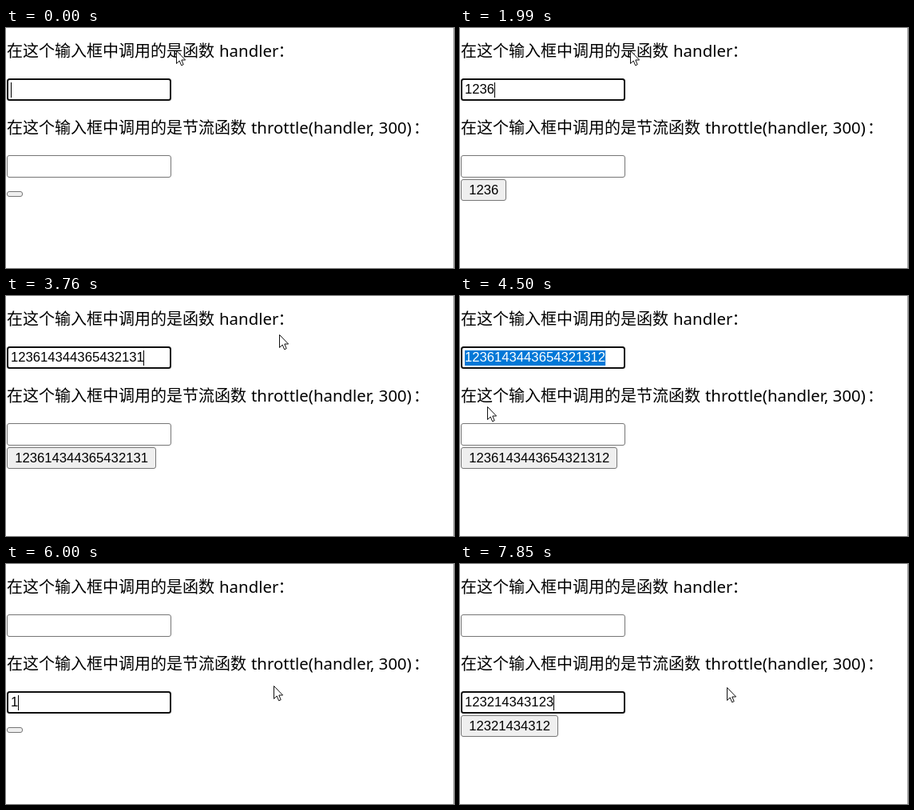
Write an HTML page that moves like this. It is 561 px wide and 300 px high and loops after 8000 ms.

```html
<!DOCTYPE html>
<html lang="zh-CN">
<head>
<meta charset="utf-8">
<style>
  html, body { margin: 0; height: 100%; overflow: hidden; background: #fff; }
  svg { display: block; }
  .label { font: 20px "Noto Sans CJK SC", "Noto Sans CJK", sans-serif; }
  .latin { font: 20.4px "Noto Sans", sans-serif; }
  .value { font: 16.667px "Liberation Sans", Arial, sans-serif; }
  .box { stroke: #767676; fill: #fff; }
  .focus { stroke: #101010; stroke-width: 2; }
  .selected { fill: #fff; }
</style>
</head>
<body>
<svg width="561" height="300" viewBox="0 0 561 300">
  <path d="M560.5 0V300" stroke="#a6a6a6"/>
  <g class="label">
    <text x="1" y="36">在这个输入框中调用的是函数</text>
    <text class="latin" x="267" y="36">handler</text>
    <text x="340.5" y="36">：</text>
    <text x="1" y="132">在这个输入框中调用的是节流函数</text>
    <text class="latin" x="307" y="132">throttle(handler, 300)</text>
    <text x="510" y="132">：</text>
  </g>
  <g id="fields"></g>
  <rect id="button" class="box" x="1.5" rx="2.5" style="fill:#efefef"/>
  <text id="caption" class="value" x="11.2" y="208"></text>
  <path id="arrow" d="M.5 .5V16.5L4.2 13L6.6 18.8L9.2 17.7L6.8 12H11.6Z" fill="#fff" stroke="#111"/>
  <path id="beam" d="M-3 -8H-1L0 -7L1 -8H3M0 -7V7M-3 8H-1L0 7L1 8H3" fill="none" stroke="#111"/>
</svg>
<script>
const LOOP = 8000, TICK = 125, DIGIT = 9.27, TEXT_X = 6;
const CLEARED = 5000, REFOCUS = 5375, FIRST_KEY = 6000, THROTTLE = 625;
const plainText = '1236143443654321312', throttledText = '123214343123';
const $ = id => document.getElementById(id);

// Key points [time, value...] joined by straight lines: typing pace, selection and pointer path.
const plainPace = [[1050, 0], [1125, 1], [1375, 3], [1875, 3.3], [3000, 11], [3875, 19]];
const throttledPace = [[5900, 0], [6000, 1], [6375, 3], [6625, 5.6], [7000, 9], [7875, 12]];
const selection = [[4000, 19], [4375, 0]];
const pointer = [[3500, 213, 28], [3625, 541, 66], [3750, 342, 48], [4250, 36, 80], [4375, 10, 125],
  [4500, 34, 138], [5000, 34, 138], [5375, 120, 174], [5875, 331, 150], [6125, 338, 153], [6875, 334, 154]];

function along(points, t) {
  const next = points.findIndex(p => p[0] > t);
  if (next < 1) return points.at(next).slice(1);
  const a = points[next - 1], b = points[next], k = (t - a[0]) / (b[0] - a[0]);
  return a.slice(1).map((v, i) => v + (b[i + 1] - v) * k);
}
const count = (points, t) => Math.round(along(points, t)[0]);

function setAttrs(el, attrs) {
  for (const key in attrs) el.setAttribute(key, attrs[key]);
}

function makeField(top) {
  const group = document.createElementNS('http://www.w3.org/2000/svg', 'g');
  group.innerHTML = `<rect/><rect y="${top + 5}" height="19" fill="#0078d7"/>
    <text class="value" x="${TEXT_X}" y="${top + 19}"><tspan></tspan><tspan class="selected"></tspan></text>
    <rect y="${top + 5}" width="1" height="19"/>`;
  $('fields').append(group);
  const [frame, highlight, caret] = group.querySelectorAll('rect');
  const [before, selected] = group.querySelectorAll('tspan');
  return (text, from, focused, showCaret) => {
    const inset = focused ? 1 : .5;
    setAttrs(frame, { class: focused ? 'box focus' : 'box', x: 1 + inset, y: top + inset,
      width: 206 - 2 * inset, height: 28 - 2 * inset, rx: 2.5 });
    before.textContent = text.slice(0, from);
    selected.textContent = text.slice(from);
    setAttrs(highlight, { x: TEXT_X + from * DIGIT, width: Math.max(0, text.length - from) * DIGIT });
    setAttrs(caret, { x: Math.floor(TEXT_X + text.length * DIGIT),
      visibility: focused && showCaret && from >= text.length ? 'visible' : 'hidden' });
  };
}

const drawPlain = makeField(63), drawThrottled = makeField(159);

function drawButton(text) {
  const right = Math.round(20.7 + text.length * DIGIT);
  setAttrs($('button'), { y: text ? 189.5 : 204.5, width: right - 2, height: text ? 26 : 6 });
  $('caption').textContent = text;
}

function drawPointer(x, y) {
  const inField = x < 207 && (y > 63 && y < 91 || y > 159 && y < 187);
  for (const id of ['arrow', 'beam'])
    setAttrs($(id), { transform: `translate(${Math.round(x)} ${Math.round(y)})`,
      visibility: inField === (id === 'beam') ? 'visible' : 'hidden' });
}

// The throttled handler reports one key behind, once per interval.
function throttledCaption(t) {
  const call = FIRST_KEY + Math.floor((t - FIRST_KEY) / THROTTLE) * THROTTLE;
  return throttledText.slice(0, Math.max(0, count(throttledPace, call) - 1));
}

function draw(now) {
  const time = now % LOOP;
  const t = Math.floor((time + 25) / TICK) * TICK;
  const swapped = t >= REFOCUS;
  const caret = time >= 1140 || Math.floor((time + 360) / 500) % 2 === 0;
  const first = t < CLEARED ? plainText.slice(0, count(plainPace, t)) : '';
  drawPlain(first, count(selection, t), !swapped, caret);
  drawThrottled(throttledText.slice(0, count(throttledPace, t)), throttledText.length, swapped, caret);
  drawButton(first || throttledCaption(t));
  drawPointer(...along(pointer, t));
  requestAnimationFrame(draw);
}
draw(0);
</script>
</body>
</html>
```
